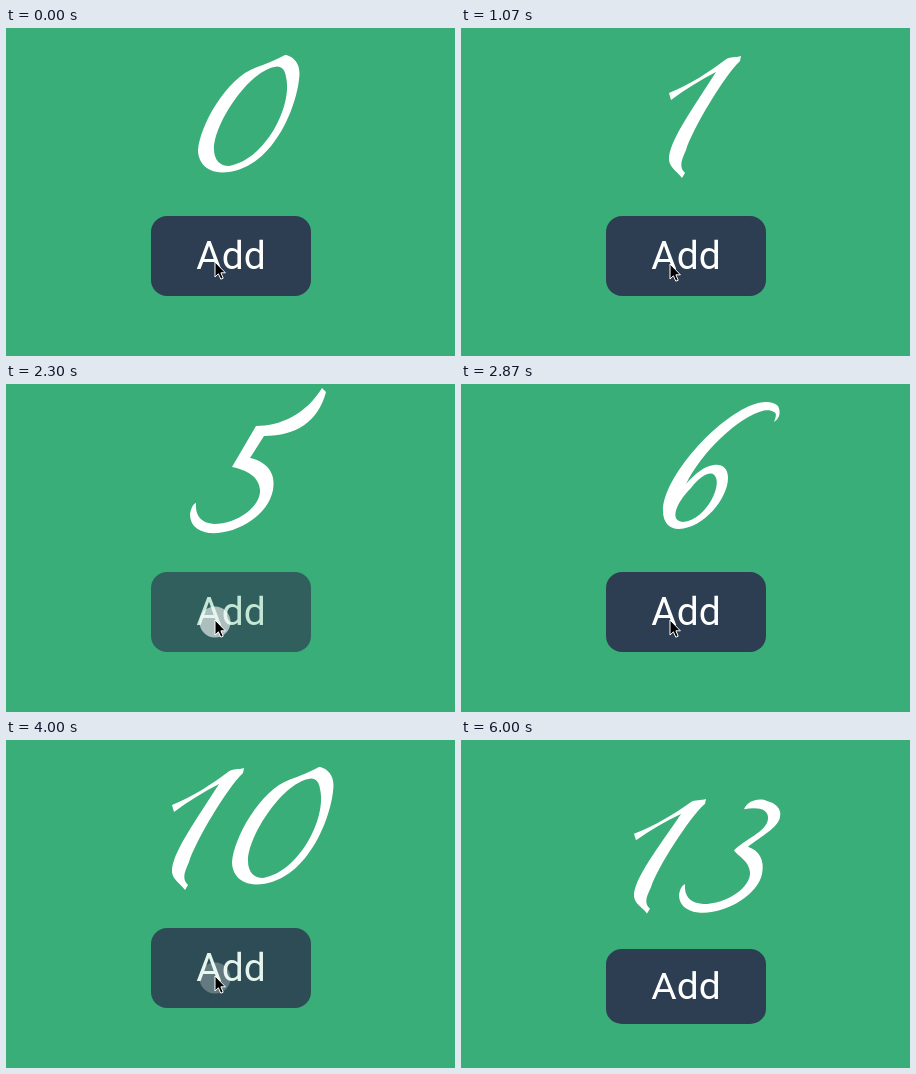
Write an HTML page that moves like this. It is 449 by 328 pixels and loops after 6.16 s.

```html
<!DOCTYPE html>
<html lang="en">
<head>
<meta charset="utf-8">
<title>Counter</title>
<style>
  html, body { margin: 0; width: 100%; height: 100%; overflow: hidden; background: #39ae78; }
  svg { display: block; width: 449px; height: 328px; }
  text { font: 400 39px Roboto, Inter, sans-serif; text-anchor: middle; fill: #fff; }
</style>
</head>
<body>
<svg viewBox="0 0 449 328">
  <g id="scene">
    <g fill="#fff" fill-rule="evenodd">
      <path id="tens"/>
      <path id="units"/>
    </g>
    <g id="button">
      <rect x="145" y="188" width="160" height="80" rx="16" fill="#2d3e52"/>
      <text x="225" y="241">Add</text>
    </g>
  </g>
  <circle id="touch" cx="209" cy="238" r="15.5" fill="#fff"/>
  <path id="cursor" d="M0 0V15L3.4 11.8L5.8 17.2L8.2 16.2L5.9 10.8H10.4Z" stroke="#fff" stroke-width="1"/>
</svg>
<script>
const LOOP = 6160;
const $ = id => document.getElementById(id);

// Each numeral: outline, advance width, shift that centres it on the stage
const numerals = [
  ["M279 27C284 27 294 33 293.5 46C292 78 266 144 216 144.5C199 144 192 133 192 122C194 98 220 50 250 39.5C260 36 270 32 279 27ZM271 38.5C244 41 208 95 208 121C208 132 214 138 223 138C259 132 287 78 280 49C279 42 276 38.5 271 38.5Z", 84, 0],
  ["M165 65C187 56 205 44 221 32C226 28 232 30 237 28L236 33C220 48 188 102 182 122C177 133 175 139 181 145L178 150C172 142 166 140 165 132C164 114 190 79 212 44C196 52 182 61 167 72Z", 68, 43],
  ["M258 57C258 45 280 27 304 27C318 27 324 34 323 43C320 66 282 95 256 117C272 117 292 119 306 123Q307 124 306.5 126L303 142C288 138 268 131 245 130C233 138 222 144 213 143C203 142 205 132 214 126C221 121 231 118 240 118C272 98 316 62 309 44C308 37 303 33 295 34C283 36 273 45 264 57C262 60 258 60 258 57ZM232 127C222 127 212 133 213 137C215 140 226 135 235 128Z", 86, -34],
  ["M249 39C252 30 264 26 272 30C280 32 287 38 285 47C284 58 266 68 253 79C264 83 270 93 267 108C263 130 230 152 203 149C190 147 184 140 184 130C185 124 187 120 190 119C189 132 195 139 208 140C232 140 256 122 255 106C254 94 243 89 239 83C249 71 272 63 273 49C274 38 262 36 249 39Z", 70, 0],
  ["M258 29L268 31C245 60 222 82 203 101C222 97 245 100 262 99C268 84 276 72 285 62L296 64C284 78 277 90 273 100L306 99L302 108L269 109C261 124 256 138 258 148L250 151C242 143 248 126 257 109C235 110 205 110 184 117L181 108C212 84 240 55 258 29Z", 80, 0],
  ["M250 42C275 42 300 30 316 4L320 8C312 38 290 52 258 52L244 74C262 78 270 90 267 106C262 132 230 151 203 149C190 147 184 140 184 130C185 124 187 120 190 119C189 132 195 139 208 140C232 140 255 122 254 106C253 92 240 86 226 83Z", 70, 0],
  ["M313 38C315 33 316 29 313 28C310 26 307 26 303 26.5C278 32 240 69 225 100C234 90 243 82 253 81C261 80 267 84 267 94C267 114 243 144 218 145C208 145 202 138 202 127C202 93 256 34 291 21C301 17 312 17 317 22C320 28 319 34 313 38ZM230 104C238 94 246 88 252 90C264 97 246 136 222 138C208 137 215 119 230 104Z", 70, 0],
  ["M196 58C198 40 208 32 222 34C246 38 275 40 299 26L303 31C270 62 232 104 216 150L204 148C216 108 248 70 277 45C252 52 226 43 212 44C205 46 202 52 201 59Z", 70, 0],
  ["M268 24C285 22 295 33 290 46C286 60 269 70 258 76C267 86 270 96 265 110C257 133 233 148 213 147C194 146 188 132 195 117C202 102 222 90 240 80C230 66 228 58 233 47C240 33 253 25 268 24ZM267 32C251 35 239 55 252 70C270 60 281 47 279 38C277 33 273 31 267 32ZM243 87C222 98 207 112 207 126C208 137 220 141 231 136C250 127 258 105 243 87Z", 76, 0],
  ["M177 130C177 135 183 138 191 138C216 138 247 107 263 78C252 87 242 90 234 89C221 87 218 78 219 68C223 48 248 29 271 28C283 27 289 34 288 43C285 78 239 146 192 146C181 146 174 140 175 133ZM270 35C252 37 231 65 232 77C233 84 243 83 249 79C265 69 277 47 276 40C276 36 274 35 270 35Z", 70, 0]
];

// Each press: start, how long it is held, fade-out time (the first adds nothing)
const presses = [
  [200, 130, 100], [930, 80, 60], [1330, 110, 90], [1670, 130, 110],
  [2000, 130, 110], [2300, 130, 110], [2620, 130, 120], [2970, 80, 80],
  [3270, 110, 90], [3530, 120, 100], [3840, 110, 90], [4100, 110, 90],
  [4350, 100, 80], [4630, 110, 360]
];

function place(id, digit, shift) {
  const [outline, , home] = numerals[digit];
  $(id).setAttribute("d", outline);
  $(id).setAttribute("transform", `translate(${home + shift})`);
}

function showNumber(n) {
  const digit = n % 10;
  const double = n > 9;
  $("tens").style.display = double ? "" : "none";
  if (double) place("tens", 1, -numerals[digit][1] / 2);
  place("units", digit, double ? numerals[1][1] / 2 : 0);
}

let shown = -1;
function draw(t) {
  const begun = presses.filter(press => t >= press[0]);
  const count = Math.max(0, begun.length - 1);
  if (count !== shown) showNumber(shown = count);

  let pressed = 0;
  if (begun.length) {
    const [start, hold, fade] = begun[begun.length - 1];
    pressed = Math.min(1, Math.max(0, 1 - (t - start - hold) / fade));
  }
  $("button").setAttribute("opacity", 1 - 0.3 * pressed);
  $("touch").setAttribute("opacity", 0.6 * pressed);

  // The closing squash moves in three quick steps
  const squash = t < 5470 ? 0 : Math.min(3, 1 + Math.floor((t - 5470) / 30)) / 3;
  $("scene").setAttribute("transform", `matrix(1 0 0 ${1 - 0.0625 * squash} 0 ${32.75 * squash})`);

  $("cursor").style.display = squash ? "none" : "";
  $("cursor").setAttribute("transform", `translate(209 ${t < 30 ? 234 : 236})`);
}

const began = performance.now();
function tick() {
  draw((performance.now() - began) % LOOP);
  requestAnimationFrame(tick);
}
tick();
</script>
</body>
</html>
```
